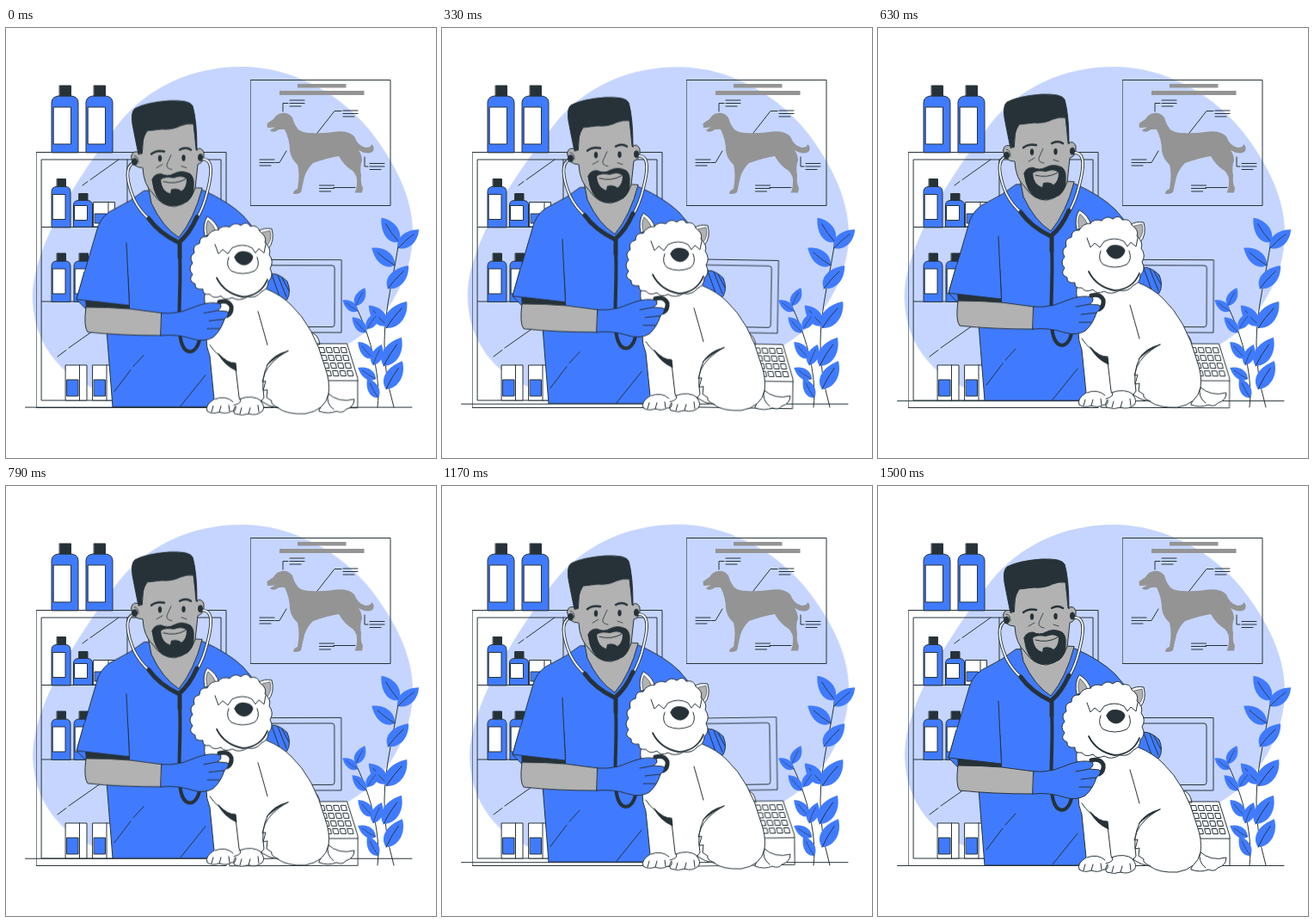
An HTML page without scripts for the animation above (1540 ms loop, 500x500 px).

```html
<!DOCTYPE html>
<html lang="en">
<head>
<meta charset="utf-8">
<title>Vet check-up</title>
<style>
  html, body { margin: 0; width: 100%; height: 100%; overflow: hidden; background: #fff; }
  svg { display: block; width: 100%; height: 100%; }
  .art { fill: none; stroke: #263238; stroke-linecap: round; stroke-linejoin: round; }
  .white { fill: #fff; }
  .blue { fill: #407bff; }
  .pale { fill: #c5d5ff; }
  .skin { fill: #b2b2b2; }
  .dark { fill: #263238; }
  .grey { fill: #949494; }
  .flat { stroke: none; }
  .tube { stroke-width: 4; }
  .pipe { stroke-width: 3.6; }
  .pipe-core { stroke: #fff; stroke-width: 1.8; }
  .float { animation: float 1540ms linear -40ms infinite; }
  .sway { animation: sway 1540ms linear -40ms infinite; }
  .backdrop { transform-origin: 252px 237px; }
  .register { transform-origin: 335px 355px; }
  @keyframes float { 50% { transform: translateY(-9px); } }
  @keyframes sway { 25% { transform: rotate(1deg); } 75% { transform: rotate(-1deg); } }
</style>
</head>
<body>
<svg viewBox="0 0 500 500">
  <defs>
    <g id="big-bottle">
      <path class="blue" d="M0 77.500V20Q0 13 8 12H23Q31 13 31 20V77.500Z"/>
      <path class="dark" d="M9.500 0H22.500V12H9.500Z"/>
      <path class="white" d="M2.500 25H22.500V68H2.500Z"/>
    </g>
    <g id="bottle">
      <path class="blue" d="M0 56V15Q0 9 6 9H16Q22 9 22 15V56Z"/>
      <path class="dark" d="M6.500 0H16.500V9H6.500Z"/>
      <path class="white" d="M1.500 18H16V47H1.500Z"/>
    </g>
    <g id="carton">
      <path class="white" d="M0 0H24.500V41H0ZM16 0V41"/>
      <path class="blue" d="M1.500 17H14.500V36H1.500Z"/>
    </g>
    <path id="note" d="M0 0H17M0 3.500H17M0 7H13"/>
    <g id="leaf">
      <path class="blue flat" d="M0 0C-13-6-11-23 0-36 11-25 12-8 0 0Z"/>
      <path stroke-width=".8" d="M0 0Q-1.500-14 0-27"/>
    </g>
    <path id="key" class="white" d="M0 0H5.500L7 6H1.500Z"/>
    <g id="key-row"><use href="#key"/><use href="#key" x="8.500"/><use href="#key" x="17"/><use href="#key" x="25.500"/></g>
    <path id="pipes" d="M149 157C137 161 141 181 149 200Q156 214 167 223M228 153C242 152 239 172 234 191Q230 208 222 222"/>
  </defs>

  <g class="art">
    <path class="sway backdrop pale flat" d="M275 45C330 45 392 75 430 128C458 167 473 202 473 238C473 288 445 340 397 368C340 400 280 425 195 431C140 436 97 424 66 396C40 370 31 342 31 310C33 255 78 180 131 111C165 69 215 45 275 45Z"/>

    <!-- cabinet -->
    <path d="M35.500 144.500H256V441.500H35.500ZM41.500 153H250V433H41.500Z"/>
    <path d="M41.500 231.500H250M41.500 318H250M141 153V231M89 183L95 178.500M98 176.500L131 153M60 382L70 374.500M73 372L120 339"/>
    <use href="#big-bottle" x="53" y="67"/>
    <use href="#big-bottle" x="93" y="67"/>
    <use href="#bottle" x="53" y="175.500"/>
    <path class="white" d="M102 202.500H126.500V231H102ZM119 202.500V231"/>
    <path class="blue" d="M103.500 216H116.500V227H103.500Z"/>
    <path class="blue" d="M78.500 231V206Q78.500 201 84 200.500H95Q100.500 201 100.500 206V231Z"/>
    <path class="dark" d="M85 192.500H95V200.500H85Z"/>
    <path class="white" d="M80 206.500H94.500V223.500H80Z"/>
    <use href="#bottle" x="53" y="262"/>
    <use href="#bottle" x="79" y="262"/>
    <use href="#carton" x="69.500" y="392"/>
    <use href="#carton" x="101" y="392"/>

    <!-- poster -->
    <path d="M284.500 60.500H447V206.500H284.500Z"/>
    <path class="grey flat" d="M339 65H395.500V69.500H339ZM318 73H416.500V78H318Z"/>
    <path class="grey flat" d="M303.500 111Q308 108 311 106Q314 100 321 99Q328 98 333 104Q335 112 340 118Q345 122 354 122Q370 123 384 120.500Q398 119 405 126Q409 137 418 139Q425 139 425 135Q430 139 426 144Q420 148 410 142Q414 148 414 154Q411 162 413 171Q412 181 415 186L414 191.500H405.500Q408 187 408 180Q409 172 403 166Q393 160 387 149Q374 151 357 157Q350 164 347 173L343 191Q339 194 334 192.500Q334 189 339 187Q342 170 339 159Q331 152 330 142Q330 130 324 118Q317 117 314 120Q309 122 307 118.500L313 115.500L304 116Z"/>
    <use href="#note" x="330" y="84"/>
    <use href="#note" x="392" y="96"/>
    <use href="#note" x="295" y="153"/>
    <use href="#note" x="423" y="157.500"/>
    <use href="#note" x="364.500" y="183"/>
    <path d="M322 97V87.500H328M362 122L382 96.500H390M313 156.500H318L326 143M417 150V161H421M381 185.500H406"/>

    <!-- cash register -->
    <g class="sway register">
      <path class="pale" d="M298 269.500H390V354H298Z"/>
      <rect class="pale" x="300" y="276" width="82" height="71.500" rx="3"/>
      <path class="white" d="M354 354Q363 355 365 368H354ZM260 410L345 367H396.500L409 407V441.500H260ZM340 410H409"/>
      <use href="#key-row" x="364" y="371.500"/>
      <use href="#key-row" x="366.500" y="380.500"/>
      <use href="#key-row" x="369" y="389.500"/>
      <use href="#key-row" x="371.500" y="398.500"/>
    </g>

    <!-- plants -->
    <path d="M451 441Q439 398 440 365C440 325 453 280 457 246M432 441C437 400 420 350 406 322"/>
    <use href="#leaf" transform="translate(457 249)rotate(-36)scale(.97)"/>
    <use href="#leaf" transform="translate(456 256)rotate(48)scale(.9)"/>
    <use href="#leaf" transform="translate(452 276)rotate(-53)scale(.93)"/>
    <use href="#leaf" transform="translate(444 303)rotate(42)"/>
    <use href="#leaf" transform="translate(443 346)rotate(-42)scale(.88)"/>
    <use href="#leaf" transform="translate(442 349)rotate(38)scale(1.090)"/>
    <use href="#leaf" transform="translate(439 393)rotate(32)scale(1.090)"/>
    <use href="#leaf" transform="translate(442 420)rotate(30)scale(1.050)"/>
    <use href="#leaf" transform="translate(407 323)rotate(26)scale(.65)"/>
    <use href="#leaf" transform="translate(409 329)rotate(-55)scale(.6)"/>
    <use href="#leaf" transform="translate(419 354)rotate(-43)scale(.67)"/>
    <use href="#leaf" transform="translate(420 350)rotate(34)scale(.65)"/>
    <use href="#leaf" transform="translate(427 384)rotate(-43)scale(.72)"/>
    <use href="#leaf" transform="translate(427 392)rotate(22)scale(.72)"/>
    <use href="#leaf" transform="translate(430 408)rotate(-58)scale(.68)"/>
    <use href="#leaf" transform="translate(433 430)rotate(-30)scale(.72)"/>

    <g class="float">
      <path d="M22.500 441.500H472"/>

      <!-- scrubs -->
      <path class="blue" d="M160 190Q145 202 128 210Q113 216 107 231L82 316L117 352L124 441H290L306 270Q296 240 276 219Q260 203 229 189Z"/>
      <path class="blue" d="M303 287Q315 283 327 295Q332 307 327 316Q316 323 300 314ZM309 287L320 318M316 288L326 313M321 291L329 306"/>
      <path d="M140 250L143.500 323M126 423L145 398M148 394L160 381M203 440L232 404"/>
      <path class="skin" d="M165 183L169 204Q182 232 201 244Q219 222 228 187Z"/>

      <!-- head -->
      <path class="skin" d="M158 146Q147 141 145.500 150Q147 163 159 163Q160 183 171 193Q181 208 196 208Q214 205 220 187L223 159Q231 157 230 145Q227 138 221 142L218 108L161 114Z"/>
      <path class="dark" d="M154 147Q151 133 147 112Q145 98 150 94Q163 87 190 85Q214 84 217 91Q222 108 222 143L218 112Q210 111 203 114Q194 119 181 118L164 120Q157 131 158 146Z"/>
      <path class="dark" d="M170 177Q172 170 180 170Q188 174 195 170Q204 165 214 170Q219 174 218 184Q219 195 211 202Q199 209 187 206Q173 202 170 177Z"/>
      <path class="skin flat" d="M180 177Q184 173 195 175Q205 171 210 176Q210 186 204 190Q200 186 192 188L191 193Q181 190 180 177Z"/>
      <path d="M183 179Q197 183 209 176"/>
      <ellipse class="dark flat" cx="179" cy="152" rx="2.200" ry="3.700"/>
      <ellipse class="dark flat" cx="206.500" cy="151.500" rx="2.200" ry="3.700"/>
      <path stroke-width="2.400" d="M169 147Q175 142 184 144M202 142Q209 138 215 142"/>
      <path stroke-width=".8" d="M192 148L187 159Q186 164 193 165M175 163L182 159M204 161L210 163M149 149Q154 149 154 157"/>

      <!-- stethoscope -->
      <use href="#pipes" class="pipe"/>
      <use href="#pipes" class="pipe-core"/>
      <ellipse class="dark" cx="149.500" cy="156" rx="3" ry="4"/>
      <ellipse class="dark" cx="226" cy="151" rx="2.500" ry="4"/>
      <path stroke-width="5" d="M166 222Q178 239 201 250Q214 239 222 220M202 251V267"/>
      <path class="tube" d="M202 264C204 302 199 338 203 362C207 382 221 381 225 363"/>

      <!-- dog body -->
      <path class="white" d="M374 425Q387 437 405 432Q405 441 395 444Q392 449 384 446Q375 450 364 446Z"/>
      <path class="white" d="M236 300Q224 314 239 340Q228 360 237 382L242 432Q231 439 234 446Q240 450 248 447Q256 450 262 446Q268 447 267 440Q263 445 266 449Q275 452 282 449Q291 452 298 446Q302 441 296 434Q306 441 316 442Q326 450 348 449Q371 445 375 426Q377 411 371 395Q358 347 331 322Q320 311 303 304Z"/>
      <path d="M237 369Q245 382 267 395L271 430Q277 436 265 439M293 330Q298 347 304 369M304 392Q296 408 300 430L297 434M327 376Q306 389 301 402L298 412L302 411L299 422L304 421L303 430L309 434Q307 438 317 442M375 426Q371 436 381 444M241 440L239 447M250 440L248 447M259 439L260 446M274 442L272 449M284 442L282 449M293 439L294 447M243 432Q255 427 264 435M271 432Q287 426 297 434"/>
      <path class="dark" d="M247 379Q258 391 267 390L268 399Q253 392 247 379ZM328 376Q311 380 303 393Q313 383 328 376Z"/>

      <!-- dog head -->
      <path class="white" d="M231 242Q228 229 234 219.500Q245 226 248 237ZM293 237Q300 232 309 234Q313 248 305 257Z"/>
      <path class="skin" stroke-width=".6" d="M234 241Q231 231 235 224Q242 230 244 237ZM298 238L307 236Q310 246 304 253Z"/>
      <path class="white" d="M247 235Q252 229 260 232Q266 225 273 230Q280 224 284 231Q293 229 295 237Q304 243 301 250Q309 257 306 264Q312 272 307 280Q312 289 305 295Q305 304 297 307Q291 315 281 313Q271 319 263 314Q254 318 250 312Q241 316 237 310Q228 311 229 304Q219 305 220 298Q211 294 217 287Q211 280 217 274Q212 266 219 262Q216 253 225 251Q225 242 234 243Q238 235 247 235Z"/>
      <path d="M243 252L247 263L252 258L258 263L263 256Q275 250 286 256L290 262L294 257L300 262L302 252M259 267Q255 277 262 283Q275 289 289 283Q296 277 292 267"/>
      <path stroke-width="1.800" d="M245 291Q254 309 275 313Q296 312 304 293"/>
      <path class="dark" d="M266 267Q268 260 276 260.500Q286 261 287 267Q285 275 277 276Q268 275 266 267Z"/>

      <!-- arm, glove, chest piece -->
      <path class="dark flat" d="M92 316L144 322V328L93 326Z"/>
      <path class="skin" d="M93 325Q120 325 144 327L182 332L181 358Q132 358 95 354Q90 348 93 325Z"/>
      <path class="blue flat" d="M82 316L143.500 323L142 290L91 283Z"/>
      <path d="M91 284L82 316L143.500 323L142 290"/>
      <path stroke-width="5" d="M248 319Q258 316 262 324Q263 332 257 335"/>
      <path class="blue" d="M181 332Q193 333 205 330L224 323Q238 318 249 321Q252 325 246 329L257 330Q261 333 254 339Q250 352 241 360Q231 366 217 362Q199 356 180 358Z"/>
      <path d="M246 329L230 332M254 339L236 341M248 350L234 350"/>
    </g>
  </g>
</svg>
</body>
</html>
```
